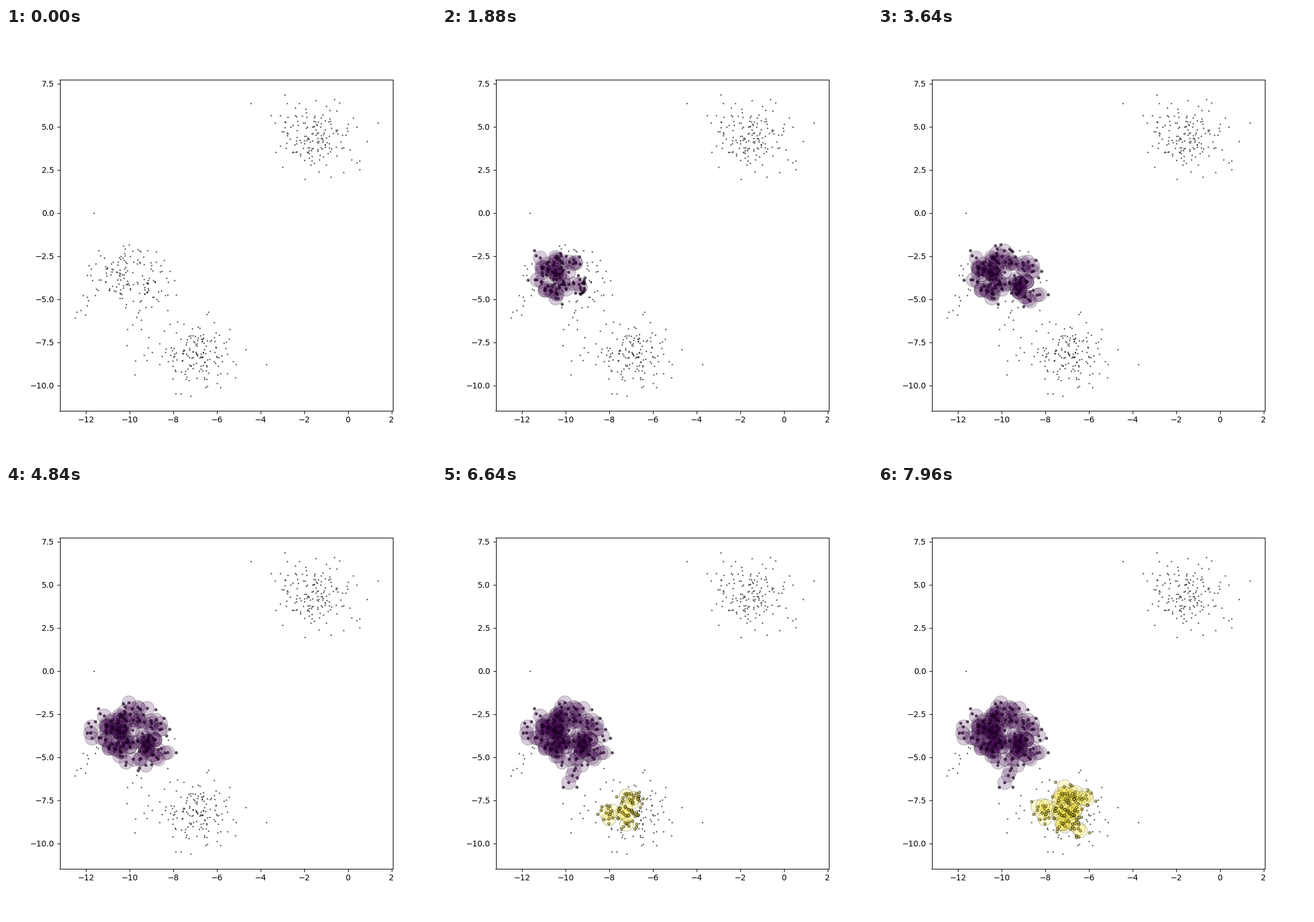
Write a matplotlib script that moves like this. It is 748 px wide and 748 px high and loops after 8000 ms.

```python
import numpy as np
import matplotlib.pyplot as plt
from matplotlib.animation import FuncAnimation

SIZE, DPI = 748, 100
FRAMES, INTERVAL = 200, 40
EPS, MIN_PTS = 0.5, 5
COLORS = np.array([plt.cm.viridis(0.0), plt.cm.viridis(1.0)])


def make_points(n=500, k=3, seed=1):
    """Shuffled Gaussian blobs around random centres."""
    rng = np.random.RandomState(seed)
    centers = rng.uniform(-10, 10, (k, 2))
    counts = [n // k + (i < n % k) for i in range(k)]
    blobs = [rng.normal(c, 1.0, (m, 2)) for c, m in zip(centers, counts)]
    order = np.arange(n)
    rng.shuffle(order)
    return np.concatenate(blobs)[order]


def cluster_steps(pts):
    """Density clustering, one visited point per step, lowest index first."""
    gaps = pts[:, None] - pts[None]
    near = np.hypot(gaps[..., 0], gaps[..., 1]) <= EPS
    is_core = near.sum(axis=1) >= MIN_PTS
    label = np.full(len(pts), -1)
    core = np.zeros(len(pts), bool)
    current = -1
    yield label.copy(), core.copy()
    for start in range(len(pts)):
        if label[start] >= 0:
            continue
        if is_core[start]:
            current += 1
            label[start] = current
        frontier = {start}
        while frontier:
            i = min(frontier)
            frontier.remove(i)
            if is_core[i]:
                core[i] = True
                fresh = np.flatnonzero(near[i] & (label < 0))
                label[fresh] = current
                frontier.update(fresh)
            yield label.copy(), core.copy()


points = make_points()
states = [s for s, _ in zip(cluster_steps(points), range(FRAMES))]

fig, ax = plt.subplots(figsize=(SIZE / DPI, SIZE / DPI), dpi=DPI)
ax.scatter(*points.T, s=1, c="black", alpha=0.5, linewidths=1)
ax.set_xlim(ax.get_xlim())
ax.set_ylim(ax.get_ylim())
discs = ax.scatter([], [], s=300, linewidths=1, zorder=2)
rings = ax.scatter([], [], s=10, linewidths=1, zorder=3)


def show(artist, mask, label, alpha):
    face = COLORS[np.minimum(label[mask], 1)]
    face[:, 3] = alpha
    artist.set_offsets(points[mask])
    artist.set_facecolor(face)
    artist.set_edgecolor((0, 0, 0, alpha))


def update(frame):
    label, core = states[frame]
    show(discs, core, label, 0.2)
    show(rings, label >= 0, label, 0.5)
    return discs, rings


anim = FuncAnimation(fig, update, frames=FRAMES, interval=INTERVAL,
                     init_func=lambda: update(0), repeat=True,
                     repeat_delay=0, blit=False)
plt.show()
```
